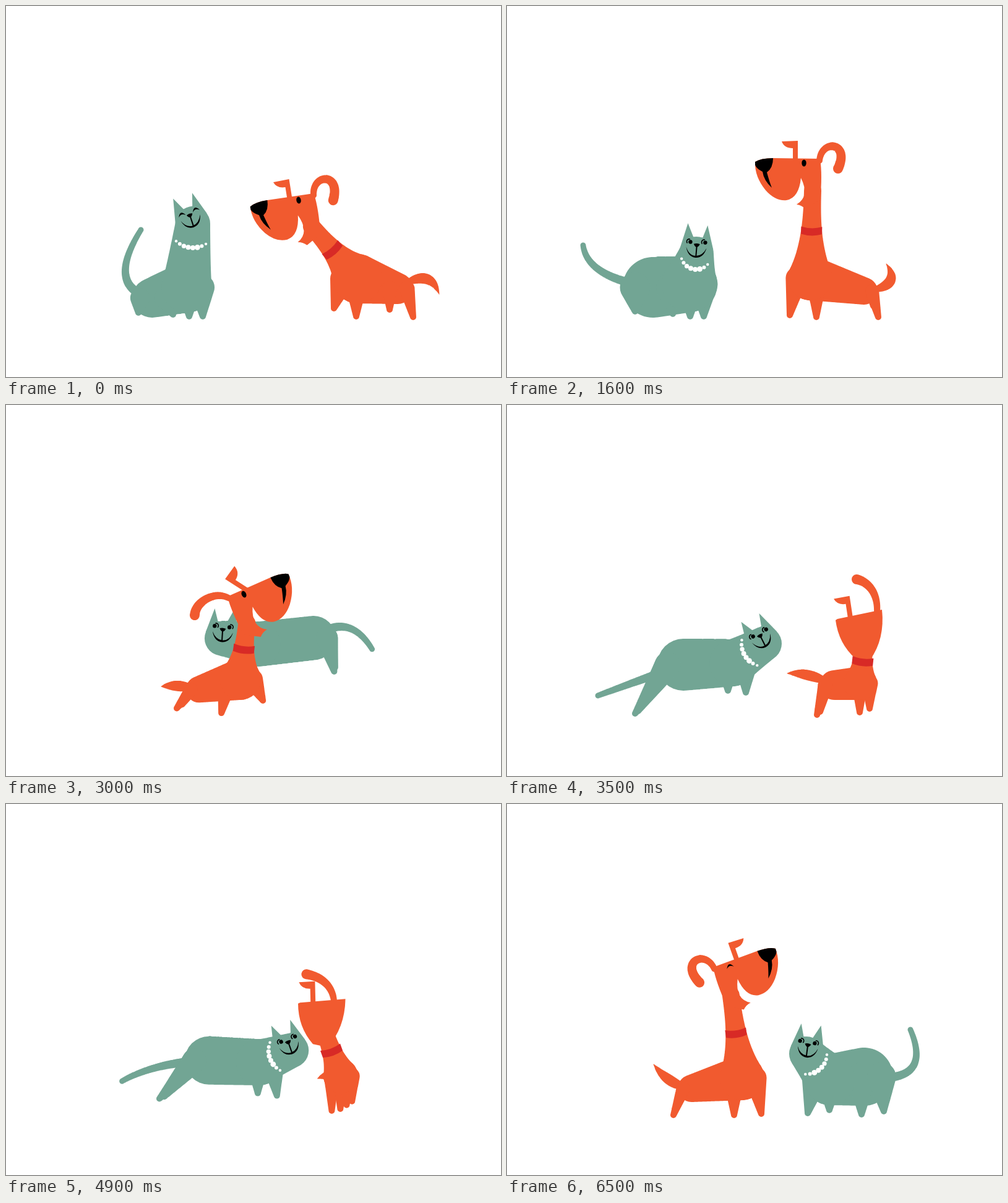
Recreate the animation shown at these times as an HTML page with a canvas. Size 800x600 px, loop 6.6 s.

```html
<!DOCTYPE html>
<html lang="en">
<head>
<meta charset="utf-8">
<title>Cat and dog</title>
<style>
html, body { margin: 0; width: 100%; height: 100%; overflow: hidden; background: #fff; }
canvas { display: block; }
</style>
</head>
<body>
<canvas id="stage" width="800" height="600"></canvas>
<script>
const ctx = document.getElementById('stage').getContext('2d');
const LOOP = 6600, STEP = 100, TAU = Math.PI * 2;
const GREEN = '#72a594', ORANGE = '#f15a2f', RED = '#d82a26';

// Both animals are rigs. hip, chest: x, y, radius. head: x, y, angle, facing (1 = as drawn).
// hind, front: two feet. tail: bend, tip. beads: necklace radius. ear: stretched, raised.
const cat = [
  { hip: [236,472,32], chest: [292,455,41], head: [302,352,-.35,1], beads: [39],
    hind: [214,496, 270,499], front: [296,502, 318,502], tail: [160,455, 218,362] },
  { hip: [236,455,49], chest: [295,450,45], head: [306,401,.05,1], beads: [25],
    hind: [207,494, 268,498], front: [296,502, 318,502], tail: [130,440, 123,387] },
  { hip: [415,404,33], chest: [498,419,36], head: [553,424,-.1,1], beads: [37],
    hind: [331,431, 345,429], front: [508,479, 543,485], tail: [335,348, 270,404] },
  { hip: [285,420,42], chest: [365,417,38], head: [416,386,-.5,1], beads: [37],
    hind: [207,499, 212,495], front: [357,462, 386,465], tail: [195,452, 147,470] },
  { hip: [480,353,33], chest: [385,375,36], head: [324,381,.1,-1], beads: [37],
    hind: [537,401, 525,393], front: [353,420, 378,420], tail: [530,302, 573,354] },
  { hip: [597,432,42], chest: [520,414,37], head: [467,369,.08,-1], beads: [37],
    hind: [575,501, 608,497], front: [476,437, 498,454], tail: [670,405, 695,490] },
  { hip: [577,441,47], chest: [522,446,41], head: [484,404,.16,-1], beads: [33],
    hind: [573,502, 609,497], front: [486,500, 521,495], tail: [690,455, 652,365] }
];
const dog = [
  { hip: [633,457,25], chest: [568,441,40], head: [473,314,-.157,1], ear: [0,0],
    hind: [620,491, 658,503], front: [530,489, 566,502], tail: [685,420, 700,466] },
  { hip: [577,461,22], chest: [490,440,36], head: [480,254,0,1], ear: [0,0],
    hind: [592,485, 600,503], front: [457,500, 500,503], tail: [640,455, 613,417] },
  { hip: [562,445,20], chest: [480,420,30], head: [415,287,.38,1], ear: [1,0],
    hind: [578,486, 610,487], front: [511,466, 505,460], tail: [625,428, 606,464] },
  { hip: [529,453,24], chest: [571,450,27], head: [592,340,0,-1], ear: [0,1],
    hind: [501,501, 506,496], front: [570,497, 586,491], tail: [488,432, 453,434] },
  { hip: [318,460,21], chest: [378,444,32], head: [395,325,-.43,-1], ear: [.85,0],
    hind: [279,485, 288,483], front: [340,496, 417,468], tail: [285,450, 257,470] },
  { hip: [292,464,22], chest: [358,445,36], head: [378,285,-.45,-1], ear: [0,0],
    hind: [269,503, 276,488], front: [357,491, 390,482], tail: [245,460, 216,483] },
  { hip: [298,460,22], chest: [380,443,36], head: [360,262,-.34,-1], ear: [0,0],
    hind: [269,503, 276,488], front: [367,503, 411,501], tail: [262,455, 237,421] }
];
// tighter landing used while chasing
cat.push(shifted(cat[5], -60));

// one pose per time: greeting, three rounds of chasing, rest
const TIMES = [0, 400, 1600, 2100, 2400, 2767, 3133, 3500, 3767, 4033, 4300, 4733, 5167, 5600, 6000, LOOP];
const CAT_PLAN = '0111274327432566', DOG_PLAN = '0111264326432566';

function shifted(p, dx) {
  const s = structuredClone(p);
  for (const k of ['hip', 'chest', 'head']) s[k][0] += dx;
  for (const k of ['hind', 'front', 'tail']) { s[k][0] += dx; s[k][2] += dx; }
  return s;
}

const mix = (a, b, u) => a + (b - a) * u;
const clamp = (v, m) => Math.max(-m, Math.min(m, v));

function sample(poses, plan, t) {
  let i = 0;
  while (TIMES[i + 1] <= t) i++;
  let u = (t - TIMES[i]) / (TIMES[i + 1] - TIMES[i]);
  u = u * u * (3 - 2 * u);
  const a = poses[plan[i]], b = poses[plan[i + 1]], out = {};
  for (const k in a) out[k] = a[k].map((v, j) => mix(v, b[k][j], u));
  out.head[3] = out.head[3] < 0 ? -1 : 1;
  out.near = +plan[u < .5 ? i : i + 1];
  return out;
}

const line = (a, b) => t => [mix(a[0], b[0], t), mix(a[1], b[1], t)];
const quad = (a, b, c) => t => line(line(a, b)(t), line(b, c)(t))(t);
const cubic = (a, b, c, d) => t => line(quad(a, b, c)(t), quad(b, c, d)(t))(t);

// sweep a circle of changing radius along a path
function tube(path, radius) {
  ctx.beginPath();
  for (let i = 0; i <= 100; i++) {
    const [x, y] = path(i / 100), r = radius(i / 100);
    ctx.moveTo(x + r, y);
    ctx.arc(x, y, r, 0, TAU);
  }
  ctx.fill();
}
const taper = (r0, r1, power = 1) => t => mix(r0, r1, t ** power);

function dot(x, y, r) {
  ctx.beginPath();
  ctx.arc(x, y, r, 0, TAU);
  ctx.fill();
}

function torso({ hip, chest, hind, front }) {
  tube(line(hip, chest), taper(hip[2], chest[2]));
  for (const [joint, feet] of [[hip, hind], [chest, front]]) {
    const [x, y, r] = joint;
    for (const foot of [feet.slice(0, 2), feet.slice(2)]) {
      tube(line([x + clamp(foot[0] - x, r * .6), y], foot), taper(r * .5, 5));
    }
  }
}

function inHead([x, y, a, side], paint) {
  ctx.save();
  ctx.translate(x, y);
  ctx.rotate(a);
  ctx.scale(side, 1);
  paint();
  ctx.restore();
}

const CAT_EARS = new Path2D('M-27-8L-16-49L-6-27L9-27L16-47L27-8Z');
const GRIN = new Path2D('M-17-11Q-12 3-1 3Q10 3 16-10Q12 6-1 6Q-14 5-17-11Z');
const MUZZLE = new Path2D('M-5-16Q0-18 5-16Q4-13 1-11L.5 4H-1.5L-1-11Q-4-13-5-16Z');
const HEAD = new Path2D('M-79-2Q-70-8-50-8L26-7Q30 20 26 60L2 74Q-4 68-12 67Q10 54-5 24Q-8 56-28 60Q-46 62-62 44Q-80 22-79-2Z');
const BACK_HEAD = new Path2D('M-14-9Q-19 38 5 72L29 70Q56 46 61 8L58 6Z');
const NOSE = new Path2D('M-79-2Q-70-8-50-8Q-50 8-60 15Q-56 30-52 40Q-65 28-67 14Q-77 9-79 3Z');
const WINK = new Path2D('M-6 3Q0-9 6 3Q0-3-6 3Z');
const FLAP = new Path2D('M4 5L4-29L-22-28Q-18-17-4-17L-4 5Z');
const COLLAR = new Path2D('M-17-7Q0-2 17-7L17 5Q0 10-17 5Z');

function catEye(x, happy) {
  ctx.save();
  ctx.translate(x, -20);
  if (happy) ctx.fill(WINK);
  else {
    dot(1.5, 1, 3.2);
    ctx.lineWidth = 1.6;
    ctx.beginPath();
    ctx.arc(-.5, .5, 4, Math.PI * .75, Math.PI * 1.6);
    ctx.stroke();
  }
  ctx.restore();
}

function drawCat(c) {
  const { hip, chest, head, tail } = c;
  ctx.fillStyle = GREEN;
  tube(quad(hip, tail.slice(0, 2), tail.slice(2)), taper(8, 4.5));
  torso(c);
  tube(line(chest, head), taper(chest[2], 28, .8));
  inHead(head, () => {
    ctx.fillStyle = GREEN;
    ctx.fill(CAT_EARS);
    ctx.fillStyle = ctx.strokeStyle = '#000';
    ctx.fill(GRIN);
    ctx.fill(MUZZLE);
    catEye(-12, c.near === 0);
    catEye(12, c.near === 0);
  });

  // the necklace hangs on the side of the head towards the chest
  ctx.fillStyle = '#fff';
  const r = c.beads[0], aim = Math.atan2(chest[1] - head[1], chest[0] - head[0]);
  for (let i = 0; i < 8; i++) {
    const a = aim + head[3] * (1 - i / 3.5) * 26 / r;
    dot(head[0] + r * Math.cos(a), head[1] + r * Math.sin(a), 2.2 + 1.8 * Math.sin(i / 7 * Math.PI) + (i === 5 ? .8 : 0));
  }
}

function dogEar([stretch, raise]) {
  const hook = [25,-4, 28,-39, 75,-34, 55,9];
  const flat = [25,-4, 50,-14, 78,-10, 108,-6];
  const up = [-6,-5, -8,-40, 12,-55, 27,-58];
  const e = hook.map((v, i) => v + (flat[i] - v) * stretch + (up[i] - v) * raise);
  tube(cubic(e.slice(0, 2), e.slice(2, 4), e.slice(4, 6), e.slice(6)), taper(5, 8));
}

function dogFlap(stretch, away) {
  ctx.save();
  if (away) {
    ctx.translate(38, -2);
    ctx.rotate(.15);
    ctx.scale(-1, 1);
  } else {
    ctx.translate(-14 + 15 * stretch, -7);
    ctx.rotate(stretch);
    ctx.scale(1, 1 + .4 * stretch);
  }
  ctx.fill(FLAP);
  ctx.restore();
}

function drawDog(d) {
  const { hip, chest, head, tail } = d;
  const away = d.near === 3;
  const [x, y, a, side] = head;
  const nx = 14 * side, ny = 45;
  const nape = [x + nx * Math.cos(a) - ny * Math.sin(a), y + nx * Math.sin(a) + ny * Math.cos(a)];
  const neck = line(nape, chest);

  ctx.fillStyle = ORANGE;
  tube(quad(hip, tail.slice(0, 2), tail.slice(2)), t => .5 + 8 * Math.sin(Math.PI * t));
  torso(d);
  tube(neck, taper(14, chest[2], 2.6));
  inHead(head, () => {
    ctx.fillStyle = ORANGE;
    dogEar(d.ear);
    dogFlap(d.ear[0], away);
    ctx.fill(away ? BACK_HEAD : HEAD);
    if (away) return;
    ctx.fillStyle = '#000';
    ctx.fill(NOSE);
    if (d.near === 2 || d.near === 6) ctx.fill(WINK);
    else {
      ctx.beginPath();
      ctx.ellipse(0, 0, 3.7, 5.6, 0, 0, TAU);
      ctx.fill();
    }
  });

  ctx.save();
  ctx.translate(...neck(.46));
  ctx.rotate(Math.atan2(chest[1] - nape[1], chest[0] - nape[0]) - Math.PI / 2);
  ctx.fillStyle = RED;
  ctx.fill(COLLAR);
  ctx.restore();
}

function draw(t) {
  ctx.fillStyle = '#fff';
  ctx.fillRect(0, 0, 800, 600);
  const c = sample(cat, CAT_PLAN, t), d = sample(dog, DOG_PLAN, t);

  // while idle the tails wag and the dog nods
  if (t < 2400 || t >= 5700) {
    const w = (t < 2400 ? t : t - 6500) / 800 * TAU;
    c.tail[2] += 5 * Math.sin(w);
    d.tail[2] += 13 * Math.sin(w);
    d.head[1] += 3 * (1 - Math.cos(w));
  }
  // whoever runs to the right passes in front
  if (c.head[3] > 0) { drawDog(d); drawCat(c); }
  else { drawCat(c); drawDog(d); }
}

const start = performance.now();
function tick() {
  const t = (performance.now() - start) % LOOP;
  draw(Math.floor(t / STEP) * STEP);
  requestAnimationFrame(tick);
}
tick();
</script>
</body>
</html>
```
